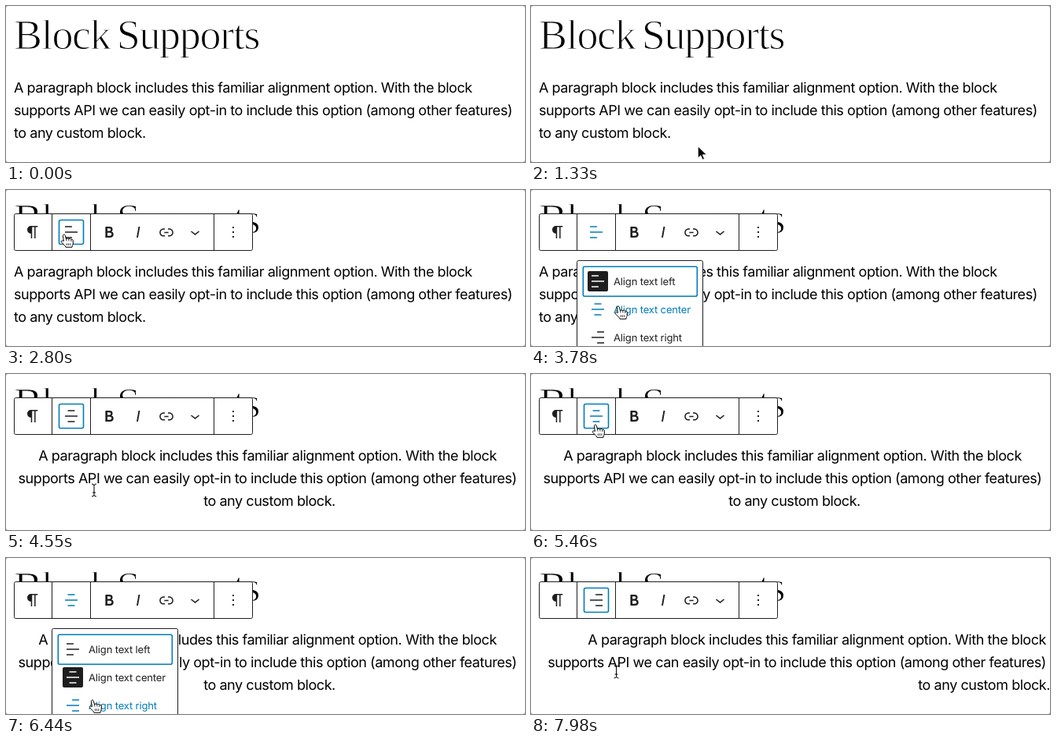
Animation of 660 by 200 pixels, one loop 8 s. Source, as an HTML page:

```html
<!DOCTYPE html>
<html lang="en">
<head>
<meta charset="utf-8">
<title>Block Supports</title>
<style>
  html, body { margin: 0; width: 660px; height: 200px; overflow: hidden; background: #999; }
  svg { display: block; background: #fff; border-radius: 3px; text-rendering: geometricPrecision; }
  .title { font: 54px "Liberation Serif", serif; letter-spacing: -1.3px; word-spacing: -4px; stroke: #fff; stroke-width: 1.25px; }
  #paragraph { font: 18px Inter, sans-serif; letter-spacing: -.443px; }
  #menu text { font: 13px Inter, sans-serif; letter-spacing: -.15px; }
  .panel { fill: #fff; stroke: #1e1e1e; }
  .ring { fill: none; stroke: #007cba; stroke-width: 1.6; }
</style>
</head>
<body>
<svg width="660" height="200" viewBox="0 0 660 200">
  <text class="title" x="10" y="55">Block Supports</text>
  <g id="paragraph">
    <text y="111">A paragraph block includes this familiar alignment option. With the block</text>
    <text y="140">supports API we can easily opt-in to include this option (among other features)</text>
    <text y="169">to any custom block.</text>
  </g>
  <path id="caret" d="M177.5 152V173" stroke="#000"/>

  <g id="toolbar" fill="#1e1e1e">
    <rect class="panel" x="10.5" y="30.5" width="303" height="47" rx="2"/>
    <path d="M58.5 30V78M107.5 30V78M264.5 30V78" stroke="#1e1e1e"/>
    <path transform="translate(22 42)" d="M18.3 4H9.9v-.1l-.9.2c-2.3.4-4 2.4-4 4.8s1.7 4.4 4 4.8l.7.1V20h1.5V5.5h2.9V20h1.5V5.5h2.7V4z"/>
    <path id="alignIcon" transform="translate(71 42)"/>
    <path transform="translate(119.4 42)" fill-rule="evenodd" d="M14.7 11.3c1-.6 1.5-1.6 1.5-3 0-2.3-1.3-3.4-4-3.4H7v14h5.8c1.4 0 2.5-.3 3.3-1 .8-.7 1.2-1.7 1.2-2.9.1-1.9-.8-3.1-2.6-3.7zm-5.1-4h2.3c.6 0 1.1.1 1.4.4.3.3.5.7.5 1.2s-.2 1-.5 1.2c-.3.3-.8.4-1.4.4H9.6V7.3zm4.6 9c-.4.3-1 .4-1.7.4H9.6v-3.9h2.9c.7 0 1.3.2 1.7.5.4.3.6.8.6 1.5s-.2 1.2-.6 1.5z"/>
    <path transform="translate(156 42)" d="M12.5 5L10 19h1.9l2.5-14z"/>
    <path transform="translate(192 42)" d="M15.6 7.2H14v1.5h1.6c2 0 3.7 1.7 3.7 3.7s-1.7 3.7-3.7 3.7H14v1.5h1.6c2.8 0 5.2-2.3 5.2-5.2 0-2.9-2.3-5.2-5.2-5.2zM4.7 12.4c0-2 1.7-3.7 3.7-3.7H10V7.2H8.4c-2.9 0-5.2 2.3-5.2 5.2 0 2.9 2.3 5.2 5.2 5.2H10v-1.5H8.4c-2 0-3.7-1.7-3.7-3.7zm4.6.9h5.3v-1.5H9.3v1.5z"/>
    <path transform="translate(228.5 42)" d="M17.5 11.6L12 16l-5.5-4.4.9-1.2L12 14l4.5-3.6 1 1.2z"/>
    <path transform="translate(277 42)" d="M13 19h-2v-2h2v2zm0-6h-2v-2h2v2zm0-6h-2V5h2v2z"/>
    <rect id="focus" class="ring" x="67.5" y="38.5" width="31" height="31" rx="2"/>
  </g>

  <g id="menu">
    <rect class="panel" x="58.5" y="90.5" width="160" height="125" rx="2"/>
    <rect class="ring" x="66.3" y="98.3" width="145" height="38" rx="2"/>
  </g>

  <g id="pointer">
    <path id="arrow" d="M0 0V15L3.5 11.8L5.9 17L8.2 16L5.9 10.9H11Z" stroke="#fff" stroke-width=".8"/>
    <path id="beam" d="M-3-8Q0-8 0-6Q0-8 3-8M0-6V6M-3 8Q0 8 0 6Q0 8 3 8M-2 3H2" fill="none" stroke="#000"/>
    <g id="hand" stroke="#000" stroke-linejoin="round">
      <path fill="#fff" d="M-1.6 8.5L-2.6 2C-3 0-.3-.8.3 1.2L1.5 6C1.8 4.6 4.3 4.5 4.7 6C5.1 4.9 7.4 5 7.8 6.6C8.4 5.8 10.2 6.1 10.3 7.8V11C10.3 13 9 14 9 16.3H1C.6 14.5-2 12.5-4.6 9.9C-5.5 8.2-3.6 7.2-1.6 8.5Z"/>
      <path fill="none" d="M1.5 6L2 8.5M4.7 6L5 8.5M7.8 6.6V9M2.4 11.3V14M4.6 11.3V14M6.8 11.3V14" stroke-width=".8"/>
    </g>
  </g>
</svg>
<script>
const LOOP = 8000, STEP = 70, BLUE = '#007cba', DARK = '#1e1e1e';
const $ = id => document.getElementById(id);
const show = (id, on) => $(id).style.display = on ? '' : 'none';
const within = (t, ...spans) => spans.some(([from, to]) => t >= from && t < to);

// Alignment: 0 left, 1 center, 2 right
const iconPath = a => {
  const x = 4 + a * 3.55;
  return `M${x} 4.2h8.9v1.5h-8.9zM4 11.2h16v1.5H4zM${x} 18.3h8.9v1.5h-8.9z`;
};
const lines = [...$('paragraph').children];

const items = ['left', 'center', 'right'].map((name, i) => {
  const y = 117.5 + i * 36;
  $('menu').insertAdjacentHTML('beforeend', `<g>
    <rect x="72" y="${y - 13.5}" width="26" height="26" rx="2" fill="${DARK}"/>
    <path transform="translate(73 ${y - 12.5})" d="${iconPath(i)}"/>
    <text x="105" y="${y + 4.5}">Align text ${name}</text></g>`);
  const [box, icon, label] = $('menu').lastElementChild.children;
  return { box, icon, label, y };
});

// Pointer stops: time, x, y
const stops = [
  [420, 320, -20], [770, 217, 183], [1260, 217, 183], [1540, 187, 163], [1890, 187, 163],
  [2240, 55, 67], [2660, 75, 57], [3220, 75, 57], [3780, 112, 149], [5180, 112, 149],
  [5460, 83, 65], [5670, 78, 59], [6020, 78, 59], [6440, 111, 182], [7840, 111, 182], [7980, 108.5, 146]
];

function pointerAt(t) {
  const i = stops.findIndex(s => s[0] > t);
  if (i < 1) return stops[i < 0 ? stops.length - 1 : 0].slice(1);
  const [t0, x0, y0] = stops[i - 1], [t1, x1, y1] = stops[i];
  const u = (t - t0) / (t1 - t0), k = u * u * (3 - 2 * u);
  return [x0 + (x1 - x0) * k, y0 + (y1 - y0) * k];
}

function render(t) {
  const [x, y] = pointerAt(t);
  const toolbar = t >= 1890;
  const menu = within(t, [2870, 4130], [5740, 6720]);
  const pressed = within(t, [2730, 2870], [5670, 5740]);
  const align = t < 4130 ? 0 : t < 6720 ? 1 : 2;

  lines.forEach((line, i) => {
    line.setAttribute('x', [10, 332.5, 655][align] + (i === 2 ? align * 2.5 : 0));
    line.setAttribute('text-anchor', ['start', 'middle', 'end'][align]);
  });
  show('caret', within(t, [1890, 2390]));

  const onBar = toolbar && x < 314 && y > 30 && y < 78;
  const onButton = onBar && x > 52 && x < 107;
  show('toolbar', toolbar);
  show('focus', t >= 2730 && !menu);
  $('alignIcon').setAttribute('d', iconPath(align));
  $('alignIcon').setAttribute('fill', menu || (onButton && !pressed) ? BLUE : DARK);

  show('menu', menu);
  items.forEach((item, i) => {
    const color = Math.abs(y - item.y) < 18 ? BLUE : DARK;
    item.box.style.display = i === align ? '' : 'none';
    item.icon.setAttribute('fill', i === align ? '#fff' : color);
    item.label.setAttribute('fill', color);
  });

  const hand = onBar || (menu && x > 58 && x < 219 && y > 90);
  const beam = !hand && within(y, [10, 70], [90, 178]);
  show('pointer', t >= 420);
  show('hand', hand);
  show('beam', beam);
  show('arrow', !hand && !beam);
  $('pointer').setAttribute('transform', `translate(${x} ${y})`);
}

const start = performance.now();
function tick() {
  const t = (performance.now() - start) % LOOP;
  render(Math.floor(t / STEP) * STEP);
  requestAnimationFrame(tick);
}
tick();
</script>
</body>
</html>
```
